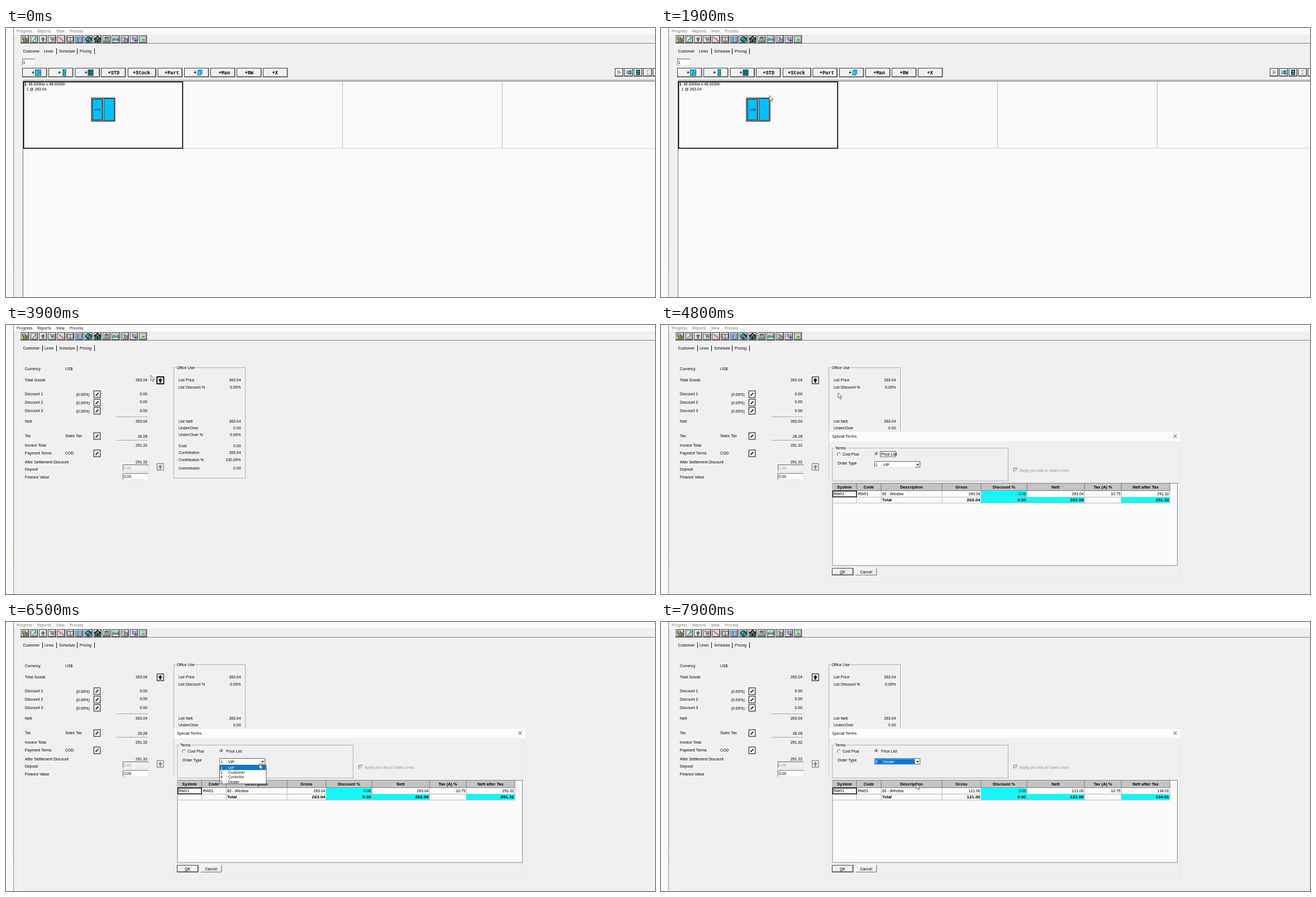
Recreate the animation shown at these times as an HTML page. Size 1162x482 px, loop 8000 ms.

```html
<!DOCTYPE html>
<html lang="en">
<head>
<meta charset="utf-8">
<title>Order pricing</title>
<style>
html, body { margin: 0; width: 100%; height: 100%; overflow: hidden; background: #f0f0f0; }
svg { display: block; width: 1162px; height: 482px; }
text { font: 6.9px "Liberation Sans", Arial, sans-serif; fill: #000; white-space: pre; }
.ui { font: 6.8px "Noto Sans", sans-serif; }
.b { font-weight: bold; font-size: 7.4px; }
.n { font-weight: bold; font-size: 7.9px; }
.m { font: bold 8.6px "Liberation Mono", monospace; }
.r { text-anchor: end; }
.c { text-anchor: middle; }
.off { fill: #999; }
.w { fill: #fff; }
</style>
</head>
<body>
<svg id="stage" viewBox="0 0 1162 482"></svg>
<script>
const rect = (x, y, w, h, fill = 'none', stroke = 'none', sw = 1) =>
  `<rect x="${x}" y="${y}" width="${w}" height="${h}" fill="${fill}" stroke="${stroke}" stroke-width="${sw}"/>`;
const path = (d, stroke = '#111', sw = 1, fill = 'none') =>
  `<path d="${d}" stroke="${stroke}" stroke-width="${sw}" fill="${fill}"/>`;
const label = (x, mid, s, cls = '') => `<text x="${x}" y="${mid + 2.5}" class="${cls}">${s}</text>`;
const group = (id, body) => `<g id="${id}">${body}</g>`;
const at = (x, y, body) => `<g transform="translate(${x} ${y})">${body}</g>`;

// Raised faces: plain, or with a dark edge around it
const raised = (x, y, w, h, face = '#f0f0f0') =>
  rect(x, y, w, h, face) +
  path(`M${x + .5} ${y + h}V${y + .5}H${x + w}`, '#fff') +
  path(`M${x} ${y + h - .5}H${x + w - .5}V${y}`, '#666');
const button = (x, y, w, h, face) =>
  raised(x + .8, y + .8, w - 1.6, h - 1.6, face) + rect(x + .5, y + .5, w - 1, h - 1, 'none', '#333');

const sunken = (x, y, w, h, fill) =>
  rect(x, y, w, h, fill) + path(`M${x + .5} ${y + h}V${y + .5}H${x + w}`, '#666') +
  path(`M${x} ${y + h - .5}H${x + w - .5}V${y}`, '#e0e0e0');

const frame = (x, y, w, h, title, tw) =>
  rect(x + .5, y + .5, w, h, 'none', '#b0b0b0') + rect(x + 4, y - 1, tw, 3, '#f0f0f0') +
  label(x + 5.5, y + .5, title);

const arrowUp = color => path('M0 -4.2L4 0H1.6V4H-1.6V0H-4Z', 'none', 0, color);

// Toolbar pictures, drawn around their centres
const icons = [
  rect(-4, -4, 5, 4, '#fff', '#111') + rect(-3, -1, 7, 5, '#d8cf4a', '#111') + path('M-1 1.5H4', '#111'),
  rect(-4, -4.5, 7, 9, '#fff', '#444', .8) + path('M-2 3L4 -4', '#1697b5', 1.8),
  arrowUp('#666'),
  path('M-5 -4H-3L-1 2H4L5 -3H-3M-2 0H4M0 -3V2M2 -3V2', '#666') + path('M-1 4H0M3 4H4', '#444', 1.6),
  path('M-5 -2H5M-5 1H5M-2 -5V5M2 -5V5', '#c4c4c4') + path('M-5 -4L-1 -1L1 1L5 4', '#d33', 1.2),
  path('M0 -3V4L-5 3V-4L0 -3L5 -4V3L0 4', '#222', 1, '#fff') + path('M-4 -1H-1M-4 1H-1M1 -1H4M1 1H4', '#888', .7),
  rect(-4.5, -4, 9, 8, '#b9dcf5', '#2757a8') + path('M-2 -4V4M-4 -1.5H4M-4 1H4', '#2757a8', .8),
  '<circle r="4.9" fill="#1444b8" stroke="#111"/>' + path('M-3 -3L1 -4L0 0L-2 2L-4 0ZM1 -1L4 0L2 4L0 2Z', 'none', 0, '#2fc56b'),
  rect(-4.5, -1, 9, 5.5, '#168b8b', '#111') + path('M-6 0L0 -5L6 0', '#4b1010', 2.2) + rect(-1, 1, 2, 4, '#111'),
  path('M-4 -2Q0 -6 4 -2', '#466', 2) + path('M-2 -2H2L5 4H-5Z', '#355', 1, '#a9c4c0') + path('M-2 1H2M-2 3H2', '#466', .7),
  rect(-3, -4, 7, 3, '#fff', '#377', .8) + rect(-5, -1, 10, 4, '#59b5b5', '#255', .8) + path('M-4 3.5H4', '#fff', 1),
  rect(-4, -4, 5, 7, '#fff', '#335', .8) + rect(-1, -1, 5.5, 5, '#d9d26a', '#234a9b') + path('M-3 -2H0M0 1H4', '#234a9b', .8),
  path('M-4 -4H1M-4 -2H1M-4 0H1M-2 2H2', '#4a45b5') + path('M3 -4V2M1 1L3 4L5 1', '#3434a2', 1.2),
  rect(-4, -4.5, 8, 9, '#e9f7e9', '#498558', .8) + rect(-2, -1, 5, 4, '#58ad6d') + path('M-2 -3H2', '#498558', .8)
];

function shell() {
  let s = rect(0, 0, 1162, 482, '#f0f0f0') + rect(0, 0, 13, 482, '#fafafa') + rect(14, 0, 1148, 11.5, '#fafafa');
  s += rect(13, 0, 1.2, 482, '#8b8b8b') + rect(12.4, 398, 1.4, 20, '#d9b98a') + rect(12.4, 430, 1.4, 52, '#c8c8c8');
  s += path('M24.5 29V482', '#f8f8f8') + path('M25 27.5H1162', '#777') + path('M25 28.5H1162', '#fff');
  s += group('menu', [[19, 'Progress'], [56, 'Reports'], [90, 'View'], [114, 'Process']]
    .map(([x, t]) => label(x, 5.4, t, 'ui')).join(''));
  icons.forEach((body, i) => {
    const x = 26.6 + i * 16.26;
    s += button(x, 13, 14.4, 14.2, '#dcdcdc') + at(x + 7.2, 20.2, body);
  });
  s += label(30.5, 41.5, 'Customer') + label(95, 41.5, 'Schedule');
  s += path('M90.5 36.5V47M127.5 36.5V47M158.5 36.5V47');
  return s;
}

function linesPage() {
  let s = label(68, 41, 'Lines') + label(132, 41.5, 'Pricing');
  s += sunken(29, 55, 24, 12.5, '#fafafa') + label(30.5, 61.5, '1');

  // Left edge, caption offset, caption
  const adds = [
    [29, 17, ''], [76, 17, ''], [123.5, 17, ''], [170, 12.5, 'STD'], [218, 9, 'Stock'],
    [271.5, 12.5, 'Part'], [319, 17, ''], [366, 14.5, 'Man'], [413, 14.5, 'RW'], [460, 16.5, 'X']
  ];
  for (const [x, dx, t] of adds)
    s += button(x, 71.5, t === 'Stock' ? 51 : 44.5, 16.8) + label(x + dx, 80.3, '+' + t, 'm');
  s += rect(52.5, 75, 10, 10, '#19d3ed', '#155') + path('M57.5 75V85M59 78L61 80L59 82', '#155', .8);
  s += rect(102, 74.5, 5, 11, '#19d3ed', '#155') + path('M102 80H107M103 76L106 79M106 81L103 84', '#155', .8);
  s += rect(147, 75, 9, 10, '#19b5bd', '#122') + path('M150 75V85M153 75V85M147 78.3H156M147 81.6H156', '#122', .9);
  s += path('M343 77L345.5 75H351V82L348.5 84.5H343ZM343 77H348.5V84.5M348.5 77L351 75', '#197f9c', .9, '#25d4f2');

  for (let i = 0; i < 5; i++) s += button(1090 + i * 17, 72, 15.5, 15);
  s += path('M1095 77H1099M1095 79.5H1101M1095 82H1099', '#444', .9);
  s += path('M1110 77H1114M1110 79.5H1114M1110 82H1114', '#444', .9) + rect(1115, 76.5, 4, 6, '#19bfcf', '#144');
  s += rect(1129, 75.5, 5.5, 8, '#19bfcf', '#111', 1.3) + path('M1129 79.5H1134', '#111');
  s += path('M1151.5 77V76H1146.5L1149.3 79.5L1146.5 83H1151.5V82', '#7b9b6a', .9);

  s += rect(30, 92.5, 1132, 1.5, '#bdbdbd') + rect(30, 94.5, 1132, 1.5, '#8d8d8d');
  s += rect(30, 96, 1132, 386, '#fafafa') + path('M30.5 95V482', '#777');
  s += path('M316 215.5H1162', '#d0d0d0') + path('M602.5 96V215M888.5 96V215', '#bcbcbc');
  s += rect(31.5, 96.5, 284.8, 119, 'none', '#000', 1.7);
  s += label(32.8, 100.2, '1', 'b') + label(40, 100.2, '48.0000w x 48.0000h') + label(36.8, 109, '1 @ 263.04');
  s += rect(153, 125.5, 42, 41.5, '#ddd', '#222', 1.2);
  s += rect(155, 127.5, 17.5, 37.5, '#00bfff', '#222', 1.2) + rect(175.5, 126.8, 18.5, 39, '#00bfff', '#333', .9);
  s += path('M173.8 126V167', '#555', .8) + path('M158.5 146.5H169M166 144L169 146.5L166 149', '#123', .9);
  return s;
}

function pricingPage() {
  let s = label(69, 41.5, 'Lines') + label(132, 41, 'Pricing') + path('M65.5 36.5V47');
  const rows = [
    ['Currency', 78.5], ['Total Goods', 98.5, '263.04'], ['Discount 1', 123.2, '0.00'],
    ['Discount 2', 138.6, '0.00', 137], ['Discount 3', 153.3, '0.00'], ['Nett', 172, '263.04'],
    ['Tax', 198, '28.28', 199], ['Invoice Total', 215.5, '291.32'], ['Payment Terms', 229],
    ['After Settlement Discount', 245, '291.32'], ['Deposit', 258], ['Finance Value', 272.5]
  ];
  for (const [name, y, value, vy] of rows) {
    s += label(33.8, y, name);
    if (value) s += label(253, vy || y, value, 'r');
  }
  s += label(106, 78.5, 'US$') + label(106, 198, 'Sales Tax') + label(106, 229, 'COD');
  for (const y of [124, 139, 153.8]) s += label(149.8, y + .2, '(0.00%)', 'r');
  for (const y of [124, 139, 153.8, 199, 230]) {
    s += rect(157.3, y - 6, 11.5, 12, '#f4f4f4', '#222', 1.1) + path(`M160.5 ${y + 2.7}L165.5 ${y - 2.5}`, '#111', 1.7);
  }
  s += path('M198 164.5H254M198 206.5H254', '#a8a8a8');
  s += sunken(209, 250, 47, 12.5, '#f0f0f0') + label(211, 256, '0.00', 'off');
  s += sunken(209, 265.5, 47, 12.5, '#fff') + label(211, 271.5, '0.00');
  s += rect(270.5, 93, 11.8, 12.2, '#f4f4f4', '#111', 1.1);
  s += group('focus', rect(270.3, 92.8, 12.2, 12.6, 'none', '#000', 1.7));
  s += group('upArrow', arrowUp('#000'));
  s += rect(270.5, 248.3, 11.5, 12, '#f0f0f0', '#666') + at(276.3, 254.4, arrowUp('#888'));

  s += frame(300, 76, 128, 198, 'Office Use', 34);
  const office = [
    ['List Price', 98.5, '263.04'], ['List Discount %', 111, '0.00%'], ['List Nett', 172, '263.04'],
    ['Under/Over', 184.5, '0.00'], ['Under/Over %', 196.8, '0.00%'], ['Cost', 216, '0.00'],
    ['Contribution', 228.5, '263.04'], ['Contribution %', 241.8, '100.00%'], ['Commission', 256.3, '0.00']
  ];
  for (const [name, y, value] of office) s += label(309, y, name) + label(420.5, y, value, 'r');
  return s;
}

const edges = [307, 350, 394, 503, 573, 655, 758, 824, 911];
const heads = ['System', 'Code', 'Description', 'Gross', 'Discount %', 'Nett', 'Tax (A) %', 'Nett after Tax'];

function cells(gross, after) {
  const line = [[3, gross], [4, '0.00'], [5, gross], [6, '10.75'], [7, after]];
  return line.map(([i, v]) => label(edges[i + 1] - 1.3, 302.8, v, 'r') +
    (i === 6 ? '' : label(edges[i + 1] - 1.3, 313.8, v, 'r n'))).join('');
}

function dialogBox() {
  let s = rect(301, 190.5, 629, 269.5, '#f0f0f0', '#e8e8e8') + rect(301, 191, 629, 17, '#fcfcfc');
  s += label(306.5, 199.5, 'Special Terms', 'ui') + path('M917.5 196.2L923.5 202.2M923.5 196.2L917.5 202.2', '#222', .9);
  s += frame(306.5, 220, 314.5, 59, 'Terms', 22);
  for (const [x, y] of [[318.8, 231.8], [386, 231]])
    s += `<circle cx="${x}" cy="${y}" r="3" fill="#fff" stroke="#d0d0d0" stroke-width=".8"/>` +
      path(`M${x - 2.2} ${y + 2.2}A3.1 3.1 0 0 1 ${x + 2.2} ${y - 2.2}`, '#444', .9);
  s += '<circle cx="386" cy="231" r="1.3" fill="#111"/>';
  s += label(325, 231.8, 'Cost Plus') + label(394, 231.2, 'Price List') + label(316, 247.8, 'Order Type');
  s += group('radioFocus', rect(392.5, 226.5, 28, 9.5, 'none', '#444', .8));

  s += sunken(382, 244, 83, 12, '#fff') + group('picked', rect(383.5, 245.5, 71, 9.5, '#0078d7'));
  s += raised(455, 245.2, 9.2, 10) + path('M457 249.3H462L459.5 251.8Z', 'none', 0, '#111');
  s += group('choice', label(384, 250.2, '1') + label(394, 250.2, ': VIP'));
  s += group('newChoice', label(384, 250.2, '5', 'w') + label(394, 250.2, ': Dealer', 'w'));
  s += sunken(631, 256, 7.5, 7.5, '#f0f0f0') + path('M633 259.5L634.5 261.2L637.5 257.5', '#888', 1);
  s += label(642, 260.2, 'Apply pro-rata to Sales Lines', 'off');

  s += rect(307, 283.5, 617.5, 147.5, '#fafafa', '#888') + rect(307.5, 284, 603.5, 13, '#c4c4c4');
  for (const [i, y] of [[4, 297.5], [4, 308.5], [5, 308.5], [7, 308.5]])
    s += rect(edges[i], y, edges[i + 1] - edges[i], 10.5, '#0ff');
  s += path('M307 308.5H911M307 319H911', '#b8b8b8') + path('M307 296.8H911', '#777');
  edges.slice(1).forEach(x => { s += path(`M${x + .2} 297V319`, '#b8b8b8') + path(`M${x + .2} 284V297`, '#777'); });
  heads.forEach((t, i) => { s += label((edges[i] + edges[i + 1]) / 2, 290.3, t, 'b c'); });
  s += label(309, 302.8, 'RW01') + label(352.5, 302.8, 'RW01') + label(396, 302.8, '82 - Window') + label(396, 313.8, 'Total', 'b');
  s += rect(307.6, 297.5, 42.4, 10.4, 'none', '#000', 1.4);
  s += group('oldSums', cells('263.04', '291.32')) + group('newSums', cells('121.00', '134.01'));

  s += button(306, 435.5, 38.5, 13) + label(325.2, 442.3, 'OK', 'c') + path('M320.5 446H325.5', '#111', .7);
  s += raised(348.5, 435.5, 38, 13) + label(367.3, 442.3, 'Cancel', 'c');

  let list = rect(382.5, 256.5, 83.5, 33.5, '#fff', '#555');
  list += '<rect id="mark" x="383" width="82.5" height="8.3" fill="#0078d7"/>';
  [['1', 'VIP'], ['2', 'Customer'], ['4', 'Contrctor'], ['5', 'Dealer']].forEach(([n, t], i) => {
    const y = 261.2 + i * 8.3;
    list += `<g class="item">${label(384, y, n)}${label(394, y, ': ' + t)}</g>`;
  });
  return s + group('list', list);
}

const stage = document.getElementById('stage');
stage.innerHTML = shell() + group('lines', linesPage()) + group('pricing', pricingPage()) +
  group('dialog', dialogBox()) +
  group('cursor', path('M0 0V9.6L2.2 7.6L3.9 11.4L5.5 10.7L3.9 7H7Z', '#444', .8, '#fff'));

const el = id => document.getElementById(id);
const show = (id, on) => el(id).setAttribute('display', on ? 'inline' : 'none');
const items = [...document.querySelectorAll('.item')];

// Pointer moves: start, end, target x, target y, ease-out power
const moves = [
  [300, 1200, 462, 107, 2], [1200, 1900, 194, 121, 2], [2100, 2900, 152, 43, 2],
  [3400, 4300, 277, 98, 2.4], [4700, 5500, 498, 227, 1.5], [5500, 5600, 478, 239, 1],
  [5600, 5900, 459, 249, 1.5], [6400, 6500, 453.5, 254, 1], [6500, 7200, 460, 285, 1.3],
  [7600, 7900, 457, 289.5, 1.5]
];

function pointer(t) {
  let x = 1339, y = 20;
  for (const [a, b, tx, ty, power] of moves) {
    if (t <= a) break;
    const p = 1 - (1 - Math.min(1, (t - a) / (b - a))) ** power;
    x += (tx - x) * p;
    y += (ty - y) * p;
  }
  return [x, y];
}

function draw(ms) {
  const t = Math.floor(ms % 8000 / 100) * 100;
  const onPricing = t >= 3300, open = t >= 4800, chosen = t >= 7700, summed = t >= 7800;
  show('lines', !onPricing);
  show('pricing', onPricing);
  show('dialog', open);
  show('focus', !open);
  show('radioFocus', t < 6200);
  show('list', t >= 6200 && !chosen);
  show('picked', chosen);
  show('choice', !chosen);
  show('newChoice', chosen);
  show('oldSums', !summed);
  show('newSums', summed);
  for (const node of el('menu').children) node.style.fill = onPricing && !open ? '#111' : '#777';
  const push = t >= 4600 && !open ? .8 : 0;
  el('upArrow').setAttribute('transform', `translate(${276.4 + push} ${99.2 + push})`);

  const [x, y] = pointer(t);
  const row = Math.max(0, Math.min(3, Math.floor((y - 257) / 8.3)));
  el('mark').setAttribute('y', 257 + row * 8.3);
  items.forEach((g, i) => { for (const n of g.children) n.style.fill = i === row ? '#fff' : '#111'; });
  show('cursor', t >= 400);
  el('cursor').setAttribute('transform', `translate(${x} ${y})`);
}

const start = performance.now();
function tick() {
  draw(performance.now() - start);
  requestAnimationFrame(tick);
}
draw(0);
requestAnimationFrame(tick);
</script>
</body>
</html>
```
